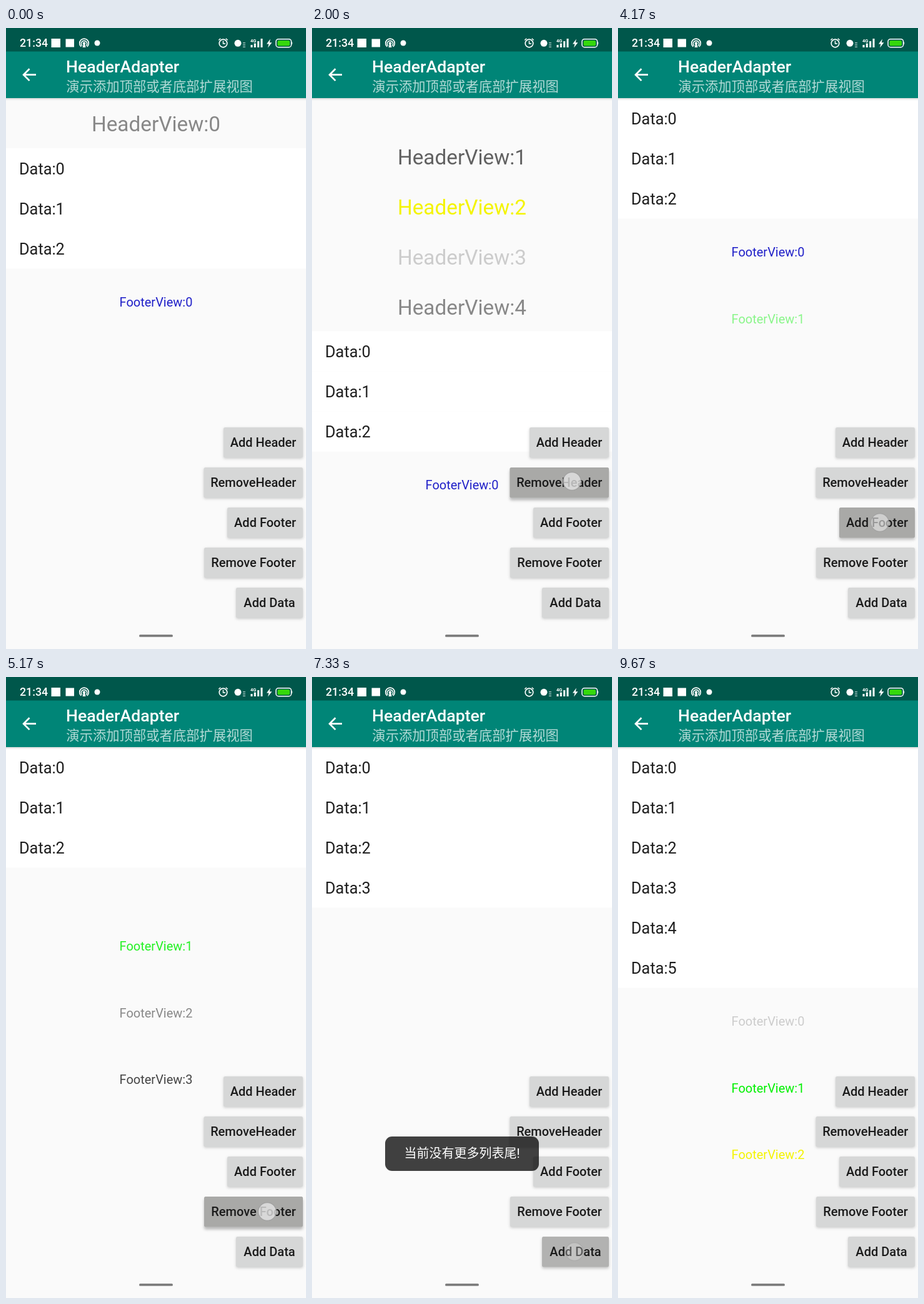
Animation of 480 by 992 pixels, one loop 9840 ms. Source, as an HTML page:

```html
<!DOCTYPE html>
<html lang="zh-CN">
<head>
<meta charset="utf-8">
<title>HeaderAdapter</title>
<style>
html, body { margin: 0; width: 100%; height: 100%; overflow: hidden; background: #fafafa; }
svg { display: block; width: 100vw; height: 100vh; font-family: Roboto, 'Noto Sans CJK SC', 'Noto Sans CJK', sans-serif; }
.header { font-size: 33.33px; text-anchor: middle; }
.footer { font-size: 20px; text-anchor: middle; }
.data { font-size: 25.33px; fill: #1e1e1e; }
.label { font-size: 20px; font-weight: 500; text-anchor: middle; fill: #1b1b1b; }
.line { fill: none; stroke: #fff; }
</style>
</head>
<body>
<svg viewBox="0 0 480 992" xmlns="http://www.w3.org/2000/svg">
  <defs>
    <filter id="soft" x="-10%" y="-40%" width="120%" height="180%"><feGaussianBlur stdDeviation="2"/></filter>
    <linearGradient id="drop" x2="0" y2="1">
      <stop stop-color="#888" stop-opacity=".28"/><stop offset="1" stop-color="#888" stop-opacity="0"/>
    </linearGradient>
  </defs>
  <rect width="480" height="992" fill="#fafafa"/>
  <g id="list"></g>

  <rect y="112" width="480" height="4" fill="url(#drop)"/>
  <rect width="480" height="112" fill="#008577"/>
  <rect width="480" height="37.5" fill="#00574b"/>

  <!-- status bar -->
  <g fill="#fff">
    <text x="22" y="30.3" font-size="17.8" font-weight="500">21:34</text>
    <rect x="72.5" y="17" width="14.5" height="14"/>
    <rect x="95.5" y="17.5" width="13.5" height="13"/>
    <circle cx="125" cy="24.5" r="2.2"/>
    <path d="M124 25h2l1.5 6h-5z"/>
    <path class="line" stroke-width="1.6" d="M121.8 28.5a4.7 4.7 0 1 1 6.4 0M120.3 30a7.3 7.3 0 1 1 9.4 0"/>
    <circle cx="146" cy="24" r="4.5"/>
    <circle class="line" cx="347.5" cy="24.5" r="6.3" stroke-width="1.7"/>
    <path class="line" stroke-width="1.5" d="M347.5 20.5v4.5h3.5M340.3 19.5l3-2.7M354.7 19.5l-3-2.7"/>
    <circle cx="371" cy="24.3" r="5.5"/>
    <path opacity=".6" d="M379 23h4v1.5h-4zM379 26.3h4v1.5h-4zM379 29.5h4v1.5h-4z"/>
    <text x="391" y="22.5" font-size="7.5" font-weight="700">4G</text>
    <path d="M391.5 27h3v4h-3zM396.8 24.5h3v6.5h-3zM402.2 21h3v10h-3zM407.5 17h3v14h-3z"/>
    <path d="M423 17.5l-6 8h3.5l-1.5 6 6.5-8.3h-3.8z"/>
    <rect class="line" x="432" y="17.7" width="24.5" height="13" rx="4" stroke-width="1.5"/>
    <path d="M457.3 21.5q2 2.7 0 5.4z"/>
    <rect x="434.5" y="20" width="19.5" height="8.4" rx="2" fill="#35d80c"/>
  </g>

  <!-- toolbar -->
  <path class="line" stroke-width="2.7" d="M48 74.7H28.5M37.5 65.3l-9.4 9.4 9.4 9.4"/>
  <text x="96" y="71.3" font-size="26.67" font-weight="500" fill="#fff">HeaderAdapter</text>
  <text x="96.3" y="101.3" font-size="21.33" fill="#b3dad6">演示添加顶部或者底部扩展视图</text>

  <g id="buttons"></g>
  <g id="toast">
    <rect x="117" y="734" width="246" height="55" rx="11" fill-opacity=".74"/>
    <text x="240" y="768.3" font-size="20" text-anchor="middle" fill="#fff">当前没有更多列表尾!</text>
  </g>
  <circle id="touch" r="14.5" fill="#e6e6e6" stroke="#a0a0a0" stroke-width="1.5"/>
  <rect x="213" y="969" width="54" height="3.8" rx="1.9" fill="#7d7d7d"/>
</svg>
<script>
const LOOP = 9840, STEP = 1000 / 6, LAST_STEP = 58;
const MOVE = 250, FADE = 120, LIST_TOP = 112;
const ROW = { header: 80, data: 64, footer: 106.67 };
const BASELINE = { header: 53.3, data: 42, footer: 61 };
const NEVER = 1e6, ALWAYS = -1e4;
const GRAY = '#888', DARK = '#444', LIGHT = '#ccc';
const BLUE = '#1f1fc8', GREEN = '#00f000', YELLOW = '#f4f400';

const $ = id => document.getElementById(id);
const clamp = v => Math.max(0, Math.min(1, v));
const ease = v => (1 - Math.cos(Math.PI * clamp(v))) / 2;

// Release times of the taps on each button.
const taps = {
  addHeader: [619, 827, 1035, 1243, 1451].slice(0, 5),
  removeHeader: [1780, 1980, 2180, 2378, 2800],
  addFooter: [4113, 4320, 4530, 8190, 8420, 8650],
  removeFooter: [4950, 5150, 5350, 5550, 5750],
  addData: [7210, 7430, 7650]
};
taps.addHeader = [623, 1035, 1243, 1451];

const series = (kind, added, removed, colors = []) => added.map((time, index) =>
  ({ kind, index, added: time, removed: removed[index] ?? NEVER, color: colors[index] }));

const items = [
  ...series('header', [ALWAYS, ...taps.addHeader], taps.removeHeader, [GRAY, DARK, YELLOW, LIGHT, GRAY]),
  ...series('data', [ALWAYS, ALWAYS, ALWAYS, ...taps.addData], []),
  ...series('footer', [ALWAYS, ...taps.addFooter.slice(0, 3)], taps.removeFooter, [BLUE, GREEN, GRAY, DARK]),
  ...series('footer', taps.addFooter.slice(3), [], [LIGHT, GREEN, YELLOW])
];

const buttons = [
  { label: 'Add Header', left: 348, top: 638, touch: [416, 652], taps: taps.addHeader },
  { label: 'RemoveHeader', left: 316.5, top: 702, touch: [416, 724], taps: taps.removeHeader },
  { label: 'Add Footer', left: 354, top: 766, touch: [419, 790], taps: taps.addFooter },
  { label: 'Remove Footer', left: 317, top: 830, touch: [418, 854], taps: taps.removeFooter },
  { label: 'Add Data', left: 368, top: 894, touch: [420, 918], taps: taps.addData }
];

const titles = { header: 'HeaderView:', data: 'Data:', footer: 'FooterView:' };

function drawItem({ kind, index, color, added, removed }, y, t) {
  const wait = kind === 'header' ? MOVE : 0;
  const alpha = clamp((t - added - wait) / FADE) * (1 - clamp((t - removed) / FADE));
  if (!alpha) return '';
  const isData = kind === 'data';
  const back = isData ? `<rect y="${y}" width="480" height="64.3" fill="#fff"/>` : '';
  const paint = isData ? '' : `fill="${color}"`;
  return `<g opacity="${alpha}">${back}<text class="${kind}" x="${isData ? 21 : 240}" ` +
    `y="${y + BASELINE[kind]}" ${paint}>${titles[kind]}${index}</text></g>`;
}

function drawList(t) {
  let y = LIST_TOP, out = '';
  for (const it of items) {
    out += drawItem(it, y, t);
    const grow = it.kind === 'header' ? ease((t - it.added) / MOVE) : +(t >= it.added);
    y += ROW[it.kind] * (grow - ease((t - it.removed - FADE) / MOVE));
  }
  return out;
}

// Strength rises just before the release and fades after it.
const pulse = (t, tap, fall) => t < tap ? clamp((t - tap + 110) / 40) : 1 - clamp((t - tap) / fall);
const strength = (t, times, fall) => Math.max(...times.map(tap => pulse(t, tap, fall)));

function drawButton({ label, left, top, taps }, t) {
  const press = strength(t, taps, 280), lift = strength(t, taps, 110), width = 475 - left;
  const box = `x="${left}" width="${width}" height="48.5" rx="2.7"`;
  return `<rect ${box} y="${top + 1.5 + 3 * lift}" fill="#888" opacity="${.4 + .2 * lift}" filter="url(#soft)"/>` +
    `<rect ${box} y="${top}" fill="#d6d7d7"/>` +
    `<rect ${box} y="${top}" fill="#a9a9a7" opacity="${clamp(press * 1.4)}"/>` +
    `<text class="label" x="${left + width / 2}" y="${top + 31}">${label}</text>`;
}

function drawTouch(t) {
  const dot = $('touch');
  dot.setAttribute('opacity', 0);
  for (const { touch, taps } of buttons) {
    const alpha = .85 * strength(t, taps, 200);
    if (!alpha) continue;
    dot.setAttribute('cx', touch[0]);
    dot.setAttribute('cy', touch[1]);
    dot.setAttribute('opacity', alpha);
  }
}

function render(t) {
  $('list').innerHTML = drawList(t);
  $('buttons').innerHTML = buttons.map(b => drawButton(b, t)).join('');
  $('toast').setAttribute('opacity', clamp((t - 5770) / 200) * (1 - clamp((t - 7770) / 200)));
  drawTouch(t);
}

const start = performance.now();
let shown = -1;
function tick() {
  const elapsed = (performance.now() - start) % LOOP;
  const step = Math.min(LAST_STEP, Math.floor((elapsed + 3.4) / STEP));
  if (step !== shown) render((shown = step) * STEP);
  requestAnimationFrame(tick);
}
tick();
</script>
</body>
</html>
```
